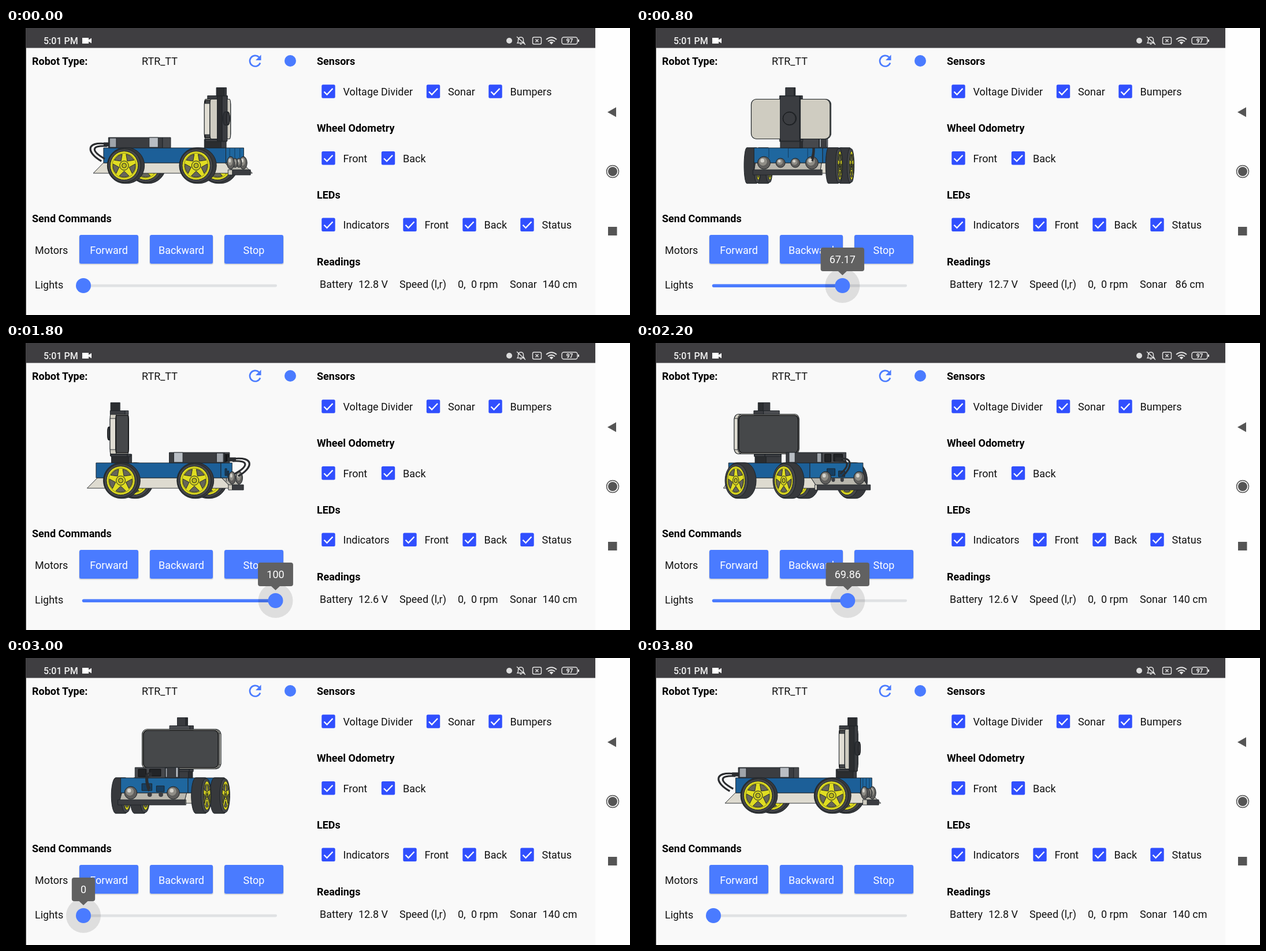
An HTML page that plays this animation: 1080x498 px, repeating every 4 s.

```html
<!DOCTYPE html>
<html lang="en">
<head>
<meta charset="utf-8">
<title>Robot info</title>
<style>
  html, body { margin: 0; width: 100%; height: 100%; overflow: hidden; background: #fafafa; }
  svg { display: block; width: 100vw; height: 100vh; }
  text { font: 18px Roboto, sans-serif; fill: #111; white-space: pre; }
  .bold { font-weight: 700; fill: #000; }
  .light { fill: #fff; }
  .mid { text-anchor: middle; }
  #robot * { vector-effect: non-scaling-stroke; }
</style>
</head>
<body>
<svg viewBox="0 0 1080 498" preserveAspectRatio="none">
  <rect width="1080" height="498" fill="#f9f9f9"/>
  <rect width="34.700" height="498"/>
  <rect x="1020" width="60" height="498" fill="#fefefe"/>
  <rect x="34.700" width="985.300" height="34.600" fill="#3f3e41"/>

  <g id="status" fill="none" stroke="#e4e4e4" stroke-width="1.4">
    <text x="65" y="28" stroke="none" style="font-size:16px;font-weight:500;fill:#f2f2f2">5:01 PM</text>
    <path d="M132 17H143V20.500L148 17.500V26.500L143 23.500V27H132Z" fill="#fff" stroke="none"/>
    <circle cx="871" cy="22" r="5" fill="#dcdcdc" stroke="none"/>
    <path d="M885 26H897L895.500 23.500V20Q895 16 891 16Q887 16 886.500 20V23.500ZM889.500 28H892.500M884 15L899 29"/>
    <rect x="911.500" y="16" width="15" height="12" rx="2.500"/>
    <path d="M916.500 19.500L921.500 24.500M921.500 19.500L916.500 24.500"/>
    <path d="M935 20Q944 12.500 953 20M938 23.200Q944 18.500 950 23.200" stroke-width="2"/>
    <path d="M940.500 25Q944 22.500 947.500 25L944 28.500Z" fill="#e4e4e4" stroke="none"/>
    <rect x="962" y="16" width="27" height="12" rx="3.500"/>
    <path d="M991 20V24" stroke-width="2"/>
    <text x="975.500" y="25.800" class="mid" stroke="none" style="font-size:10px;font-weight:700;fill:#f2f2f2">97</text>
  </g>

  <g id="nav" fill="#555">
    <path d="M1041 146L1056 137.500V154.500Z"/>
    <circle cx="1050" cy="249" r="8"/>
    <circle cx="1050" cy="249" r="10.500" fill="none" stroke="#555" stroke-width="1.500"/>
    <rect x="1042" y="345" width="15.500" height="15"/>
  </g>

  <g fill="none" stroke="#4a7bff" stroke-width="2.700">
    <path d="M437.800 50.500A9.300 9.300 0 1 0 440 60.500"/>
    <path d="M441.500 46.500V56H432Z" fill="#4a7bff" stroke="none"/>
    <circle cx="492" cy="57" r="10" fill="#4a7bff" stroke="none"/>
  </g>

  <g id="robot"></g>
  <g id="labels"></g>
  <g id="controls"></g>
  <g id="slider">
    <rect x="132" y="444.800" width="337" height="4.600" rx="2.300" fill="#e0e2e4"/>
    <path id="level" stroke="#4a7bff" stroke-width="5.400" stroke-linecap="round"/>
    <circle id="halo" cy="447" fill="#000" opacity=".11"/>
    <circle id="thumb" cy="447" r="13" fill="#4a7bff"/>
    <g id="tip">
      <rect id="tipBox" y="381" height="41" rx="4" fill="#616161"/>
      <path d="M-8 421.500H8L0 429Z" fill="#616161"/>
      <text id="tipText" class="light mid" y="408"></text>
    </g>
  </g>
</svg>
<script>
const STEP = 200, LOOP = 4000;
const $ = id => document.getElementById(id);

// Keyframes as [time, value]
const TURN = [[0, 15], [400, 68.5], [800, 99], [1400, 148.5], [2200, 230], [3000, 284.5], [3800, 369.5]];
const LIGHT = [[0, 0], [200, 3.36], [400, 27.29], [800, 67.17], [1200, 97], [1400, 100], [1800, 100],
  [2200, 69.86], [2600, 24], [2800, 7], [3000, 0], [3800, 0]];
const SONAR = [[0, 140], [400, 136], [600, 112], [800, 86], [1000, 117], [1200, 140]];
const VOLTS = [[0, 12.8], [400, 12.7], [1200, 12.6], [2600, 12.7], [2800, 12.8]];

const held = (keys, t) => keys.filter(k => k[0] <= t).pop()[1];
function blend(keys, t) {
  const i = keys.findIndex(k => k[0] > t);
  if (i < 0) return keys[keys.length - 1][1];
  const [t0, a] = keys[i - 1], [t1, b] = keys[i];
  return a + (b - a) * (t - t0) / (t1 - t0);
}

// Static interface
const label = (x, y, s, cls = '', id = '') => `<text x="${x}" y="${y}" class="${cls}" id="${id}">${s}</text>`;
const button = (x, w, s) =>
  `<rect x="${x - 1}" y="360" width="${w + 2}" height="51" rx="4" opacity=".12"/>
   <rect x="${x}" y="359" width="${w}" height="50" rx="3" fill="#4a7bff"/>` + label(x + w / 2, 391.5, s, 'light mid');
const checkbox = (x, y, s) =>
  `<rect x="${x - 11.7}" y="${y - 11.7}" width="23.400" height="23.400" rx="2.500" fill="#304ffe"/>
   <path d="M${x - 7.5} ${y + 0.5}l5 5l10 -10.500" fill="none" stroke="#fff" stroke-width="2.300"/>` + label(x + 25.5, y + 7, s);

$('labels').innerHTML =
  [[45, 64, 'Robot Type:'], [45, 336.5, 'Send Commands'], [538, 64, 'Sensors'], [538, 180, 'Wheel Odometry'],
   [538, 295.5, 'LEDs'], [538, 411.5, 'Readings']].map(a => label(...a, 'bold')).join('') +
  [[235, 64, 'RTR_TT'], [50, 391.5, 'Motors'], [50, 451.5, 'Lights'], [543, 451, 'Battery'],
   [681, 451, 'Speed (l,r)'], [782, 451, '0,'], [805, 451, '0 rpm'], [872, 451, 'Sonar']].map(a => label(...a)).join('') +
  label(610, 451, '', '', 'volts') + label(958.5, 451, '', 'mid', 'sonar');
$('controls').innerHTML =
  button(127, 102, 'Forward') + button(249, 109, 'Backward') + button(378, 102, 'Stop') +
  checkbox(558, 110, 'Voltage Divider') + checkbox(739.5, 110, 'Sonar') + checkbox(847, 110, 'Bumpers') +
  checkbox(558, 225.7, 'Front') + checkbox(661.5, 225.7, 'Back') + checkbox(558, 341.3, 'Indicators') +
  checkbox(699, 341.3, 'Front') + checkbox(802, 341.3, 'Back') + checkbox(902, 341.3, 'Status');

// Robot: u runs forward, w to its right side, y down; it turns about the vertical axis
const INK = '#1d2226', DARK = '#3b3d41', BLACK = '#2b2d30', CREAM = '#cfccc1', PALE = '#dedbd0', BLUE = '#1c5f98';

function wheelArt() {
  const at = (r, deg) => `${r * Math.cos(deg * Math.PI / 180)} ${r * Math.sin(deg * Math.PI / 180)}`;
  let s = `<circle r="25" fill="#e0dd22" stroke="${INK}"/><circle r="21.500" fill="none" stroke="#77751c" stroke-width=".8"/>`;
  for (let k = 0; k < 5; k++) {
    const a = 72 * k - 54;
    s += `<path d="M${at(9.5, a)}L${at(20, a - 26)}A20 20 0 0 1 ${at(20, a + 26)}Z" fill="#66665a" stroke="${INK}" stroke-width=".9"/>`;
  }
  return s + `<circle r="8" fill="#d4d120" stroke="${INK}"/><circle r="4" fill="#bdba22" stroke="${INK}"/>`;
}
const WHEEL = wheelArt();

function robot(deg) {
  const C = Math.cos(deg * Math.PI / 180), S = Math.sin(deg * Math.PI / 180);
  const px = (u, w) => 282 + u * C - w * S;
  const poly = (pts, fill) =>
    `<path d="M${pts.map(([u, w, y]) => px(u, w).toFixed(1) + ' ' + y).join('L')}Z" fill="${fill}" stroke="${INK}" stroke-width=".9"/>`;
  const wall = (u0, u1, w, y0, y1, fill, flare = 0) =>
    poly([[u0, w, y0], [u1, w, y0], [u1 + flare, w, y1], [u0 - flare, w, y1]], fill);
  // flare widens the bottom edge along u
  const box = (u0, u1, w0, w1, y0, y1, side, end = side, flare = 0) => {
    const u = S > 0 ? u1 : u0, low = u + (S > 0 ? flare : -flare);
    return wall(u0, u1, C > 0 ? w1 : w0, y0, y1, side, flare) +
      poly([[u, w0, y0], [u, w1, y0], [low, w1, y1], [low, w0, y1]], end);
  };
  const drum = (xa, xb, y, rx, ry, fill) => {
    const l = Math.min(xa, xb), r = Math.max(xa, xb);
    return `<path d="M${l} ${y - ry}A${rx} ${ry} 0 0 0 ${l} ${y + ry}H${r}A${rx} ${ry} 0 0 0 ${r} ${y - ry}Z" fill="${fill}" stroke="${INK}"/>`;
  };
  const endFace = (u, art) => `<g transform="matrix(${-S} 0 0 1 ${px(u, 0)} 0)">${art}</g>`;
  const sideFace = (u, w, y, art) => `<g transform="matrix(${C} 0 0 1 ${px(u, w)} ${y})">${art}</g>`;

  const wheel = (u, s) => {
    const out = s * C > 0, y = 238.7, c = Math.abs(C), face = s * (out ? 83 : 60);
    return drum(px(u, s * 63), px(u, s * 80), y, 31 * c, 31, '#37393c') +
      drum(px(u, s * (out ? 80 : 63)), px(u, face), y, 29 * c, 29, '#45474a') +
      sideFace(u, face, y, WHEEL);
  };
  const wheels = s => [71, -58].sort((a, b) => (a - b) * S).map(u => wheel(u, s)).join('');

  // Lamps stick out a little, so they flatten when seen from the side
  const lamp = (u, w, r) => {
    const x = px(u, w), k = .45 + .55 * Math.abs(S);
    const spot = (dx, dy, size, style) =>
      `<ellipse cx="${x + dx * r * k}" cy="${234 + dy * r}" rx="${size * r * k}" ry="${size * r}" ${style}/>`;
    return spot(0, 0, 1, `fill="#5f5e5c" stroke="${INK}"`) +
      spot(-.15, -.2, .65, 'fill="#8f8d86"') + spot(-.25, -.35, .3, 'fill="#d5d3cc"');
  };
  const lamps = (u, places) => places.sort((a, b) => (a - b) * C)
    .map(w => lamp(u, w, Math.abs(w) > 20 ? 11 : 8)).join('');

  const chassis = () => {
    const hull = box(-102, 116, -58, 58, 234, 252, PALE, '#b9b7ae', 18) +
      box(-101, 118, -60, 60, 208, 234, BLUE, '#1f679f');
    return S > 0
      ? hull + box(122, 130, -60, 60, 246, 255, CREAM, DARK) +
        endFace(118, `<path d="M-34 209V225M34 209V225M0 209V225" stroke="#123c60" fill="none"/>`) +
        lamps(122, [-42, 42, -13, 13])
      : hull + box(-121, -114, -60, 60, 246, 255, CREAM, DARK) +
        endFace(-102, `<path d="M-22 218h18v12h-18zM4 222h14v10h-14z" fill="#163f62" stroke="${INK}"/>
          <circle cx="-8" cy="237" r="4" fill="${DARK}"/><circle cx="12" cy="237" r="4" fill="${DARK}"/>`) +
        lamps(-117, [-38, 38]);
  };

  const battery = () => {
    const w = C > 0 ? 20 : -34;
    const ports = `<path d="M-28 193h14v13h-14zM-8 193h20v12h-20z" fill="#222427" stroke="#0d0e0f"/>`;
    return box(-103, -6, -34, 20, 190, 208, DARK, '#46484c') +
      wall(-30, -14, w, 190, 207, '#b9bec4') + wall(-101, -89, w, 191, 207, '#9fa4aa') +
      (S < 0 ? endFace(-103, ports) : '');
  };
  const cable = () => sideFace(0, -4, 0,
    `<path d="M-103 202H-118M-112 201C-152 196 -148 217 -122 231M-112 205C-142 203 -140 214 -116 227" fill="none" stroke="${BLACK}" stroke-width="3.200"/>
     <path d="M-118 202H-103" stroke="${BLACK}" stroke-width="7"/>`);

  const slab = (u, fill, inner = '') => endFace(u,
    `<rect x="-69" y="123.500" width="138" height="69" rx="9" fill="${fill}" stroke="${INK}" stroke-width="1.200"/>` + inner);
  const phone = () => {
    const screen = `<rect x="-67" y="125.500" width="134" height="65" rx="7.500" fill="#46484a" stroke="#151617" stroke-width="1.600"/>`;
    const back = slab(82, '#d8d5ca', screen), front = slab(92, CREAM), rim = box(82, 92, -69, 69, 131, 185, '#e0ddd3', CREAM);
    return S > 0 ? back + rim + front : front + rim + back;
  };
  const clamps = () => box(74, 100, -18, 18, 117.5, 124, DARK, '#4a4c50') +
    box(68, 98, -17, 17, 193, 208, BLACK, '#3a3c40') + box(70, 99, -18, 18, 193, 197, DARK);
  const arm = () => box(87, 101, -7.5, 7.5, 103.5, 118, BLACK, '#393b3f');
  const post = () => box(91, 100, -17, 17, 118, 196, BLACK, DARK);
  const knob = () => drum(px(100, 0), px(106, 0), 157, 11.5 * Math.abs(S), 11.5, '#303236') +
    `<ellipse cx="${px(106, 0)}" cy="157" rx="${11 * Math.abs(S)}" ry="11" fill="${DARK}" stroke="#17191b"/>`;

  const upper = S > 0 ? [cable, battery, clamps, arm, phone, post, knob] : [arm, knob, post, phone, clamps, battery, cable];
  const near = C > 0 ? 1 : -1;
  return wheels(-near) + chassis() + upper.map(part => part()).join('') + wheels(near);
}

function drawSlider(t) {
  const v = blend(LIGHT, t), x = 134 + 3.325 * v, pressed = t >= 200 && t < 3400;
  const text = v % 100 ? v.toFixed(2) : String(v);
  const width = 30 + (text.includes('.') ? 45.5 : 10.3 * text.length);
  $('level').setAttribute('d', v ? `M134.500 447.200H${x}` : '');
  $('thumb').setAttribute('cx', x);
  $('halo').setAttribute('cx', x);
  $('halo').setAttribute('r', pressed ? (t < 400 ? 25 : 30) : 0);
  $('tip').setAttribute('visibility', pressed ? 'visible' : 'hidden');
  $('tip').setAttribute('transform', `translate(${x} 0)`);
  $('tipBox').setAttribute('x', -width / 2);
  $('tipBox').setAttribute('width', width);
  $('tipText').textContent = text;
}

function draw(t) {
  $('robot').innerHTML = robot(blend(TURN, t));
  $('volts').textContent = held(VOLTS, t) + ' V';
  $('sonar').textContent = held(SONAR, t) + ' cm';
  drawSlider(t);
}

const start = performance.now();
let shown = -1;
function tick() {
  const t = Math.floor((performance.now() - start) % LOOP / STEP) * STEP;
  if (t !== shown) draw(shown = t);
  requestAnimationFrame(tick);
}
tick();
</script>
</body>
</html>
```
